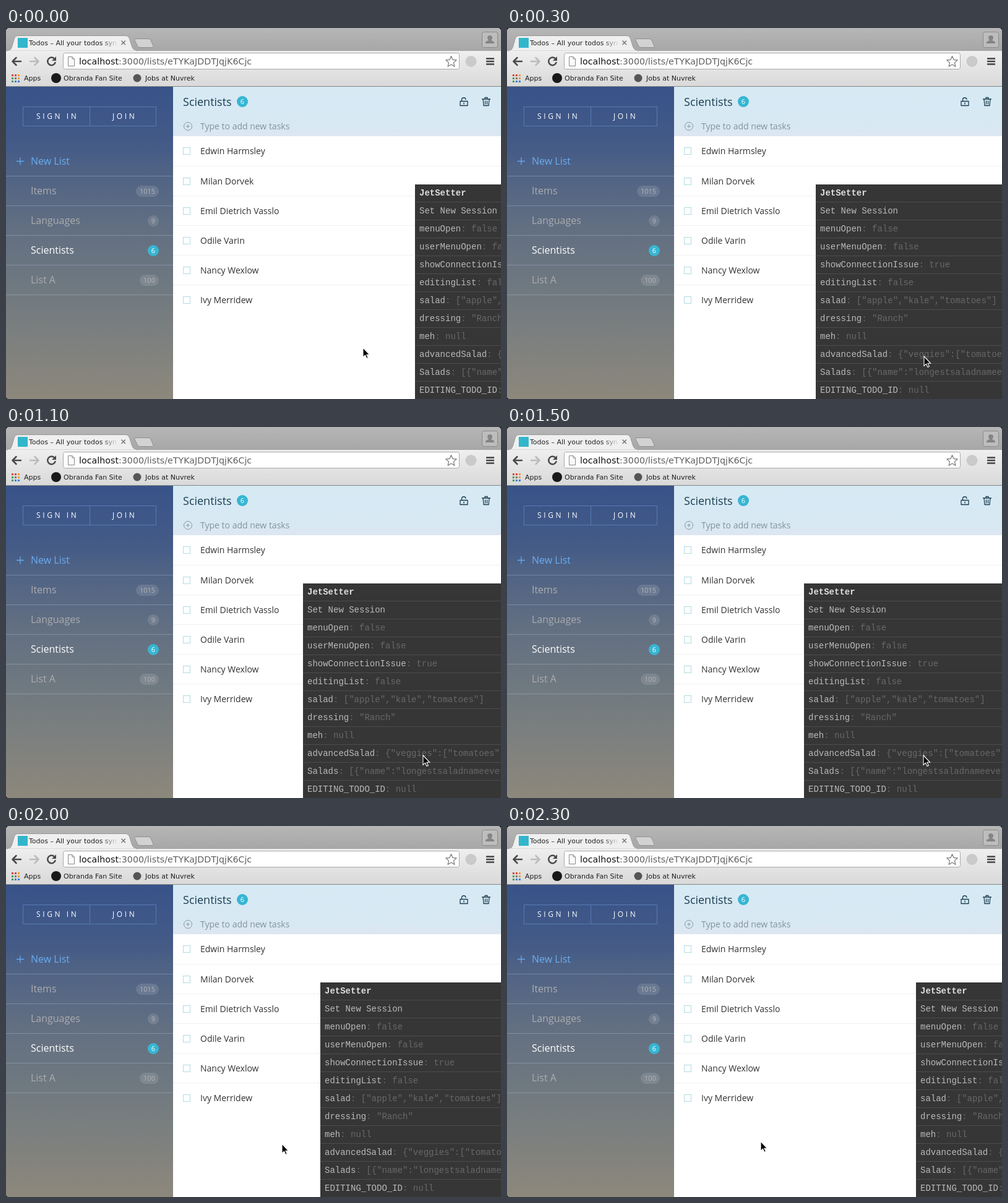
Write an HTML page that moves like this. It is 800 px wide and 600 px high and loops after 2.4 s.

```html
<!DOCTYPE html>
<html lang="en">
<head>
<meta charset="utf-8">
<title>Todos</title>
<style>
  html, body { margin: 0; width: 100%; height: 100%; overflow: hidden; background: #000; }
  svg { display: block; width: 800px; height: 600px; }
  text { white-space: pre; }
  .ui { font: 11px "DejaVu Sans", sans-serif; }
  .app { font-family: "Open Sans", sans-serif; }
  .mono { font: 14px "Liberation Mono", monospace; }
  .line { fill: none; stroke-linecap: round; stroke-linejoin: round; }
</style>
</head>
<body>
<svg viewBox="0 0 800 600">
  <defs>
    <linearGradient id="strip" x2="0" y2="1"><stop stop-color="#b6b6b6"/><stop offset="1" stop-color="#a7a7a7"/></linearGradient>
    <linearGradient id="bar" x2="0" y2="1"><stop stop-color="#efefef"/><stop offset="1" stop-color="#d9d9d9"/></linearGradient>
    <linearGradient id="side" x2="0" y2="1">
      <stop stop-color="#385389"/><stop offset=".2" stop-color="#455b87"/>
      <stop offset=".25" stop-color="#4d6185"/><stop offset=".45" stop-color="#626f82"/>
      <stop offset=".67" stop-color="#717a80"/><stop offset="1" stop-color="#8d887c"/>
    </linearGradient>
    <linearGradient id="head" x2="0" y2="1"><stop stop-color="#d6eaf4"/><stop offset=".8" stop-color="#d8e8f3"/><stop offset="1" stop-color="#dde6f2"/></linearGradient>
    <linearGradient id="fade" gradientUnits="userSpaceOnUse" x1="155" x2="181" y1="0" y2="0"><stop stop-color="#222"/><stop offset="1" stop-color="#222" stop-opacity="0"/></linearGradient>
    <clipPath id="window"><path d="M0 5Q0 0 5 0H795Q800 0 800 5V600H4Q0 600 0 596Z"/></clipPath>
  </defs>
  <g clip-path="url(#window)">
    <!-- browser -->
    <rect width="800" height="37" fill="url(#strip)"/>
    <rect y="36" width="800" height="58" fill="url(#bar)"/>
    <path d="M0 36.500H800" stroke="#a2a2a2"/>
    <path d="M2 37C9 36 9 32 12 22C14 14 15 12.500 21 12.500H192C198 12.500 199 15 201 22C204 32 205 36 212 37Z" fill="#efefef" stroke="#999"/>
    <path d="M3 37.500H211" stroke="#efefef" stroke-width="2"/>
    <path d="M209 17.500H230Q233 17.500 234 20L238 29Q239 31.500 236 31.500H217Q213.500 31.500 212.500 29L208 20Q207 17.500 209 17.500Z" fill="#d2d2d2" stroke="#8f8f8f"/>
    <rect x="19" y="16" width="16" height="16" fill="#32b6cc"/>
    <text class="ui" x="37" y="28" fill="url(#fade)">Todos – All your todos syn</text>
    <path d="M186.500 20.500l6.500 6.500m0-6.500l-6.500 6.500" stroke="#777" stroke-width="1.500"/>
    <rect x="769.500" y="6.500" width="25" height="25" rx="3" fill="#bdbdbd" stroke="#8a8a8a"/>
    <path d="M775 25V23Q776 21 780 20Q778 18 778 15.500Q778 12 782 12T786 15.500Q786 18 784 20Q788 21 789 23V25Z" fill="#858585"/>

    <g class="line" stroke-width="2.500">
      <path d="M24 54H11M16.500 48L10.500 54L16.500 60" stroke="#4a4a4a"/>
      <path d="M39 54H52M46.500 48L52.500 54L46.500 60" stroke="#bbb"/>
      <path d="M78.500 50A6.300 6.300 0 1 0 79.500 56" stroke="#4a4a4a"/>
    </g>
    <path d="M81 46V53H74Z" fill="#4a4a4a"/>
    <rect x="92.500" y="40.500" width="640" height="26" rx="3" fill="#fff" stroke="#a8a8a8"/>
    <path d="M100.500 46.500H107L110.500 50V61.500H100.500ZM107 46.500V50H110.500" fill="#fafafa" stroke="#888"/>
    <text class="ui" x="118" y="59" style="font-size:14.250px" fill="#111">localhost<tspan fill="#606060">:3000/lists/eTYKaJDDTJqjK6Cjc</tspan></text>
    <path class="line" d="M719.500 45.500l2.500 5.800 6.200.6-4.700 4.200 1.400 6.200-5.400-3.300-5.400 3.300 1.400-6.200-4.700-4.200 6.200-.6Z" stroke="#777" stroke-width="1.200"/>
    <circle cx="751.500" cy="54" r="9" fill="#cacaca"/>
    <path d="M776 49.500H789M776 54H789M776 58.500H789" stroke="#444" stroke-width="2.600"/>
    <g id="apps"></g>
    <circle cx="81" cy="81" r="8" fill="#191919"/>
    <circle cx="212" cy="81" r="6.500" fill="#555"/>
    <g class="ui" fill="#1d1d1d">
      <text x="29" y="85">Apps</text>
      <text x="93" y="85">Obranda Fan Site</text>
      <text x="225" y="85">Jobs at Nuvrek</text>
    </g>
    <rect y="94" width="800" height="1" fill="#858585"/>

    <!-- page -->
    <rect x="270" y="95" width="530" height="505" fill="#fff"/>
    <rect x="270" y="95" width="530" height="80" fill="url(#head)"/>
    <rect y="95" width="270" height="505" fill="url(#side)"/>
    <path d="M27.500 127.500H242.500V158.500H27.500ZM135.500 127.500V158.500" fill="none" stroke="#587bb2"/>
    <g class="app" font-size="12" letter-spacing="3.600" fill="#fff">
      <text x="49" y="147">SIGN IN</text><text x="172" y="147">JOIN</text>
    </g>
    <path d="M17 215.500H29M23 209.500V221.500" stroke="#62a8ee" stroke-width="1.300"/>
    <text class="app" x="40" y="221" font-size="16" fill="#68adf1">New List</text>
    <g class="app" id="lists"></g>

    <text class="app" x="286" y="126" font-size="18" fill="#1c3f53">Scientists</text>
    <g class="app" id="count"></g>
    <g class="line" stroke="#1c3f53" stroke-width="1.300">
      <path d="M734 118.500H746V125.500H734ZM736.500 118V115.500A3.300 3.300 0 0 1 743 115.500M740 121V123"/>
      <path d="M769.500 115H782.500M771 115L772 125.500H780L781 115M774 115V112.500H778V115M774.500 118V123M777.500 118V123"/>
    </g>
    <path d="M291 159H297M294 156V162" stroke="#8797a2"/>
    <circle cx="294" cy="159" r="6.500" fill="none" stroke="#8797a2"/>
    <text class="app" x="314" y="164" font-size="14" fill="#85929c">Type to add new tasks</text>
    <g class="app" id="tasks" font-size="14" fill="#333"></g>

    <g id="panel" class="mono">
      <rect y="253" width="330" height="347" fill="#363636"/>
    </g>
    <path id="cursor" d="M0 0V15.500L3.500 12.200L6 17.600L8.300 16.500L5.900 11.300H10.600Z" fill="#000" stroke="#fff" stroke-width="1.100"/>
  </g>
</svg>
<script>
const $ = id => document.getElementById(id);
const add = (id, markup) => $(id).insertAdjacentHTML('beforeend', markup);

const badge = (right, y, n, on) => {
  const w = n > 999 ? 37 : n > 99 ? 31 : 18;
  return `<rect x="${right - w}" y="${y - 9}" width="${w}" height="18" rx="9" fill="${on ? '#36b6d3' : '#ffffff1f'}"/>
    <text x="${right - w / 2}" y="${y + 4}" font-size="11" text-anchor="middle" fill="${on ? '#fff' : '#b3b5b8'}">${n}</text>`;
};

['#d9483b', '#d9483b', '#e79a35', '#4a9b57', '#777', '#e79a35', '#4a9b57', '#3d7ed0', '#3d7ed0'].forEach((color, i) =>
  add('apps', `<rect x="${9 + i % 3 * 5}" y="${75 + (i / 3 | 0) * 5}" width="3" height="3" fill="${color}"/>`));

[['Items', 1015], ['Languages', 9], ['Scientists', 6], ['List A', 100]].forEach(([name, n], i) => {
  const y = 264 + 48 * i, on = name === 'Scientists';
  add('lists', `<text x="40" y="${y + 5}" font-size="16" fill="${on ? '#fff' : '#abacae'}">${name}</text>` + badge(247, y, n, on));
});
for (let y = 239; y < 440; y += 48) add('lists', `<rect y="${y}" width="270" height="1" fill="#a9bed6" opacity=".38"/>`);
add('count', badge(391, 119, 6, true));

['Edwin Harmsley', 'Milan Dorvek', 'Emil Dietrich Vasslo', 'Odile Varin', 'Nancy Wexlow', 'Ivy Merridew'].forEach((name, i) => {
  const y = 199 + 48 * i + (i > 0);
  add('tasks', `<rect x="286.500" y="${y - 5.5}" width="11" height="11" fill="#fff" stroke="#b2dbe2"/><text x="314" y="${y + 5}">${name}</text>`);
  if (i < 5) add('tasks', `<rect x="270" y="${223 + 48 * i}" width="530" height="1" fill="#f1f1f1"/>`);
});

[['JetSetter'], ['Set New Session'], ['menuOpen', 'false'], ['userMenuOpen', 'false'], ['showConnectionIssue', 'true'],
 ['editingList', 'false'], ['salad', '["apple","kale","tomatoes"]'], ['dressing', '"Ranch"'], ['meh', 'null'],
 ['advancedSalad', '{"veggies":["tomatoes",'], ['Salads', '[{"name":"longestsaladnameever"'], ['EDITING_TODO_ID', 'null']
].forEach(([key, value], i) => {
  const y = 271 + 29 * i;
  add('panel', `<text x="7" y="${y}" fill="${i ? '#bababa' : '#dedede'}" font-weight="${i ? 400 : 700}">${key}${value ? `<tspan fill="#686868">: ${value}</tspan>` : ''}</text>`);
  if (i < 11) add('panel', `<rect y="${y + 10}" width="330" height="1" fill="#4c4c4c"/>`);
});

// The standard "ease" curve, cubic-bezier(.25, .1, .25, 1).
function ease(x) {
  if (x <= 0 || x >= 1) return x <= 0 ? 0 : 1;
  let a = 0, b = 1, s;
  for (let i = 0; i < 20; i++) {
    s = (a + b) / 2;
    if (.75 * s * (1 - s) + s ** 3 < x) a = s; else b = s;
  }
  return .3 * s * (1 - s) ** 2 + 3 * s * s * (1 - s) + s ** 3;
}

// time, x, y
const path = [[0, 577, 517], [100, 640, 527], [200, 671, 531], [300, 674, 531], [1300, 674, 531], [1500, 673, 531],
  [1800, 673, 531], [1900, 600, 524], [2000, 446, 514], [2100, 422, 511], [2200, 412, 510], [2300, 410, 510]];

function pointer(t) {
  const i = Math.max(1, path.findIndex(p => p[0] >= t));
  const [t0, x0, y0] = path[i - 1], [t1, x1, y1] = path[i], k = (t - t0) / (t1 - t0);
  return [x0 + (x1 - x0) * k, y0 + (y1 - y0) * k].map(Math.round);
}

const start = performance.now();
const place = (id, x, y) => $(id).setAttribute('transform', `translate(${x} ${y})`);

function draw() {
  const t = Math.floor((performance.now() - start) % 2400 / 100) * 100;
  const open = ease((t - 165) / 220) - ease((t - 1970.5) / 220);
  place('panel', Math.round(661 - 181 * open), 0);
  place('cursor', ...pointer(t));
  requestAnimationFrame(draw);
}
draw();
</script>
</body>
</html>
```
